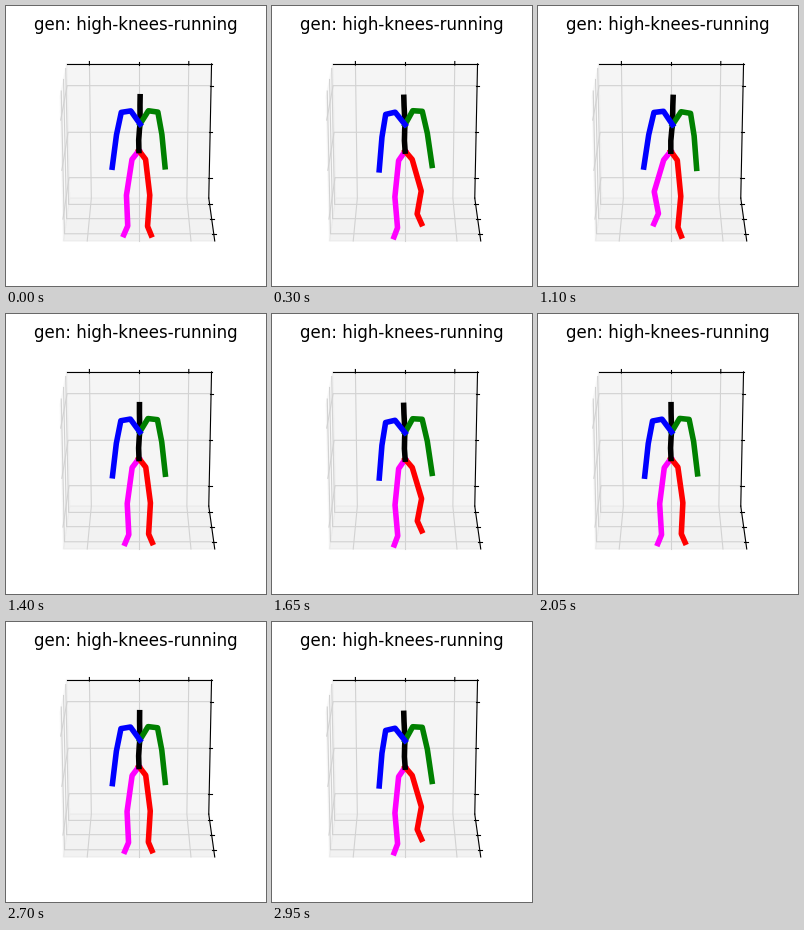
These frames come from a looping animation (260x280 px, 3 s). A matplotlib script:

```python
import numpy as np
import matplotlib.pyplot as plt
from matplotlib.animation import FuncAnimation

W, H, DPI = 260, 280, 100
FRAMES, STEP = 60, 50

fig = plt.figure(figsize=(W / DPI, H / DPI), dpi=DPI, facecolor="white")
ax = fig.add_axes([0, 0, 1, 1])
ax.set_xlim(0, W)
ax.set_ylim(H, 0)
ax.axis("off")

# --- room: a perspective box seen from slightly above ---
HALF = np.array([0.5953, 0.5953, 0.4464])
TILT = np.radians(20)
SCALE, CX, CY = 1243.2, 133.1, 144.5
TICKS = np.array([-1, 0, 1]) * 0.5 / (0.7 * 25 / 24)


def project(*points):
    """Unit-cube points (-1..1) to stage pixels."""
    x, y, z = (np.array(points, float) * HALF).T
    up = y * np.cos(TILT) - z * np.sin(TILT)
    depth = 10 - y * np.sin(TILT) - z * np.cos(TILT)
    return CX + SCALE * x / depth, CY - SCALE * up / depth


def pane(shade, axis):
    """Fill the wall on the low side of one axis."""
    square = np.array([(-1, -1), (1, -1), (1, 1), (-1, 1)])
    color = (shade,) * 3 + (0.5,)
    ax.fill(*project(*np.insert(square, axis, -1, axis=1)),
            facecolor=color, edgecolor=color, lw=1)


def line(color, *points):
    ax.plot(*project(*points), color=color, lw=0.8)


for axis, shade in enumerate((0.95, 0.90, 0.925)):
    pane(shade, axis)

GRID = "#d2d2d2"
for k in TICKS:
    line(GRID, (k, 1, -1), (k, -1, -1), (k, -1, 1))
    line(GRID, (1, k, -1), (-1, k, -1), (-1, k, 1))
    line(GRID, (1, -1, k), (-1, -1, k), (-1, 1, k))

line("black", (-1, 1, -1), (1, 1, -1))
line("black", (1, -1, -1), (1, 1, -1))
line("black", (1, -1, -1), (1, -1, 1))
INNER, OUTER = 1 - 1 / 60, 1 + 1 / 30
for k in TICKS:
    line("black", (k, INNER, -1), (k, OUTER, -1))
    line("black", (INNER, k, -1), (OUTER, k, -1))
    line("black", (INNER, -1, k), (OUTER, -1, k))

ax.text(130, 24.45, "gen: high-knees-running", fontsize=12,
        family="DejaVu Sans", ha="center", va="baseline")

# --- runner: mirrored limbs around a spine, x measured from the midline ---
MID, PIVOT = 133, 140
SPINE = np.array([(0, 144.5), (-0.4, 134), (0.2, 123), (0.7, 118),
                  (0.3, 99), (0.3, 90.7)])
ARM = np.array([(0.7, 118), (8.8, 104.8), (18.3, 106.2), (22.7, 128.6),
                (26.4, 161)])
LEG = np.array([(0, 144.5), (6.8, 153.4), (11.6, 189.3), (9.9, 220.3),
                (13.6, 229)])
KNEE_UP = np.array([(0, 0), (0, 0), (3.5, -4), (0.2, -13.2), (0.6, -11.6)])

STRIDE, LEFT_PEAK = 1320, 1090


def mirror(limb, side):
    out = limb * (side, 1)
    if limb is ARM:
        out[0] = limb[0]
    return out


def lift(c):
    u = np.clip((c - 0.4) / 0.5, 0, 1)
    return u * u * (3 - 2 * u)


def place(pose, sway, bob):
    """Lean the body sideways about its pivot and tilt it with each step."""
    x, y = pose.T
    return (MID + x + 0.037 * sway * (y - PIVOT),
            y + 0.7 * bob - (0.035 + 0.06 * sway) * x)


COLORS = ("magenta", "red", "black", "green", "blue")
limbs = [ax.plot([], [], color=c, lw=4)[0] for c in COLORS]


def update(i):
    swing = np.cos(2 * np.pi * (i * STEP - LEFT_PEAK) / STRIDE)
    left, right = lift(swing), lift(-swing)
    poses = (mirror(LEG + left * KNEE_UP, -1), mirror(LEG + right * KNEE_UP, 1),
             SPINE, mirror(ARM, 1), mirror(ARM, -1))
    for limb, pose in zip(limbs, poses):
        limb.set_data(*place(pose, -swing, left + right))
    return limbs


anim = FuncAnimation(fig, update, frames=FRAMES, interval=STEP, repeat=True,
                     repeat_delay=0)
plt.show()
```
